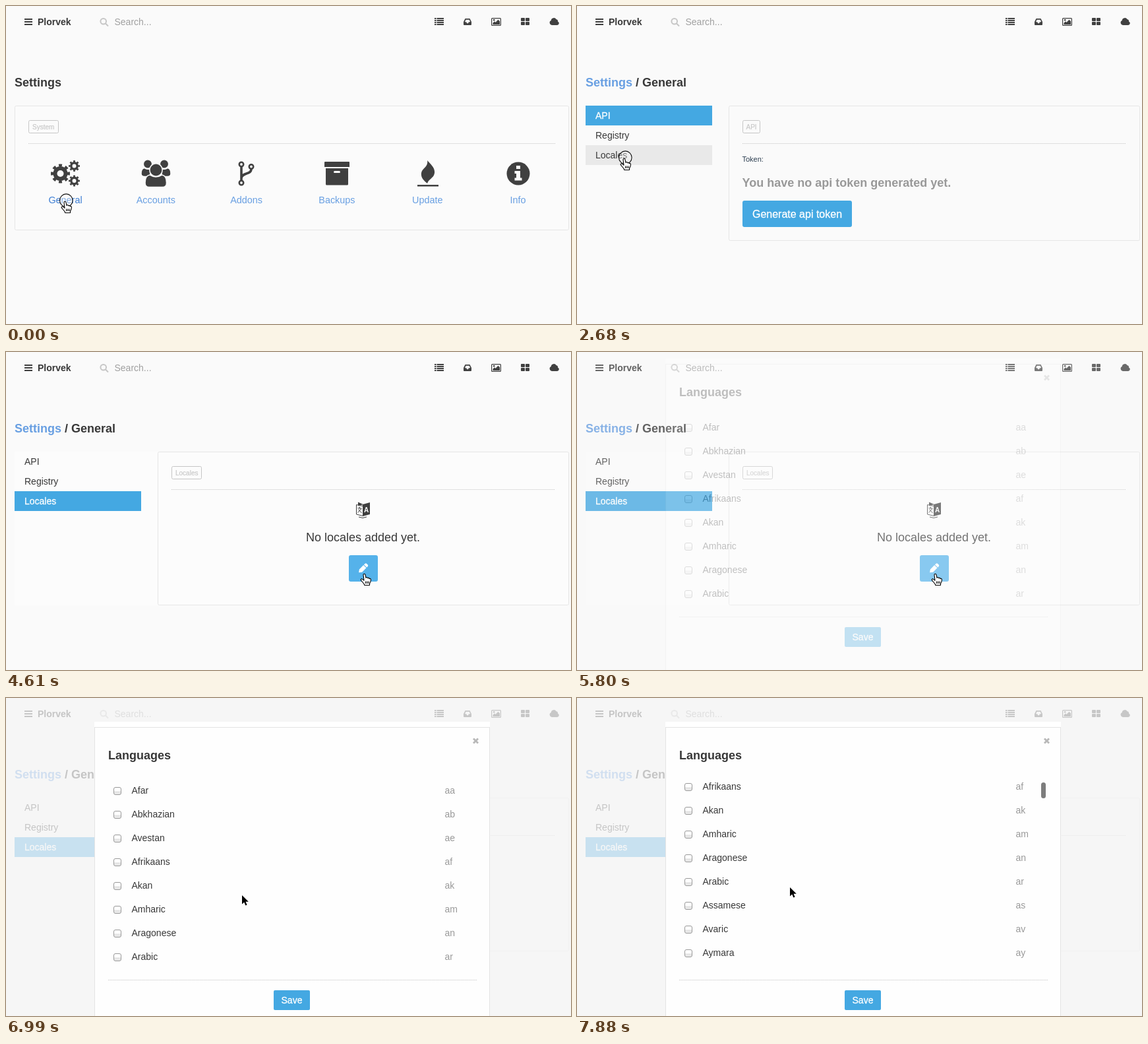
An HTML page for the animation above (8000 ms loop, 857 px wide and 482 px high).

```html
<!DOCTYPE html>
<html lang="en">
<head>
<meta charset="utf-8">
<title>Settings</title>
<style>
  html, body { margin: 0; width: 100%; height: 100%; overflow: hidden; background: #fafafa; }
  svg { display: block; position: absolute; left: 0; top: 0; }
  text { font: 14px "Liberation Sans", Arial, sans-serif; fill: #383838; white-space: pre; }
  .title { font-size: 18px; font-weight: bold; }
  .mid { text-anchor: middle; }
  .link { font-size: 14.4px; fill: #689fe2; text-anchor: middle; }
  .badge text { font-size: 10px; fill: #c8c8c8; stroke: #c8c8c8; stroke-width: .2; }
  .badge rect { fill: none; stroke: #c6c6c6; }
  .white { fill: #fff; stroke: #fff; stroke-width: .3; }
  .panel { stroke: #e6e6e6; }
  .dots { stroke: #c4c4c4; stroke-dasharray: 1 1; }
  .icon { fill: #404040; }
  .line { fill: none; stroke: #404040; }
  .blue { fill: #44a8e2; }
  .code { fill: #999; }
</style>
</head>
<body>
<svg width="857" height="482" viewBox="0 0 857 482">
  <defs>
    <linearGradient id="shade" x2="0" y2="1">
      <stop offset=".45" stop-color="#fff"/><stop offset=".6" stop-color="#e2e2e2"/><stop offset="1" stop-color="#eee"/>
    </linearGradient>
    <clipPath id="window"><rect x="135" y="122" width="598" height="291"/></clipPath>
  </defs>

  <g id="header">
    <path class="icon" d="M28 19h12v2H28zM28 23h12v2H28zM28 27h12v2H28z"/>
    <text x="48" y="29" font-weight="bold" style="font-weight:bold">Plorvek</text>
    <g fill="none" stroke="#c6c6c6" stroke-width="2"><circle cx="147.7" cy="23.2" r="4.3"/><path d="M151 26.5l4 4"/></g>
    <text x="164.500" y="29" style="fill:#a0a0a0">Search...</text>
    <path class="line" stroke-width="2" d="M650 19h2.500M650 22h2.500M650 25h2.500M650 28h2.500M653.500 19H664M653.500 22H664M653.500 25H664M653.500 28H664"/>
    <path class="icon" fill-rule="evenodd" d="M696.500 19h7l2.500 5v4q0 1-1 1h-10q-1 0-1-1v-4zM697.500 20.700l-1.500 3.500h2.200l1 2h1.800l1-2h2.200l-1.500-3.500z"/>
    <rect class="line" x="736.600" y="18.600" width="13.800" height="10.800" rx="1" stroke-width="1.200"/>
    <path class="icon" d="M738.500 28v-2.300l2.500-2.500 1.500 1.500 4-4 2.500 2.500V28z"/><circle class="icon" cx="740.200" cy="21.300" r="1.300"/>
    <g class="icon"><rect x="781" y="18" width="6" height="5" rx="1"/><rect x="788" y="18" width="6" height="5" rx="1"/><rect x="781" y="24" width="6" height="5" rx="1"/><rect x="788" y="24" width="6" height="5" rx="1"/></g>
    <path class="icon" d="M828 29a3.700 3.700 0 0 1-1.300-7a4.300 4.300 0 0 1 8-1.800a2.500 2.500 0 0 1 2.300 3.200a2.900 2.900 0 0 1-1 5.600z"/>
  </g>

  <g id="home">
    <text class="title" x="13" y="122">Settings</text>
    <rect class="panel" x="13.500" y="151.500" width="840" height="188" rx="2" fill="#fbfbfb"/>
    <g class="badge"><rect x="34.500" y="173.500" width="45" height="19" rx="2"/><text x="40" y="187">System</text></g>
    <path class="dots" d="M34 208.500H833"/>
    <g id="gears"></g>
    <g class="icon" stroke="#fbfbfb" stroke-width="1.500">
      <circle cx="215" cy="239.500" r="6.700"/><circle cx="240" cy="239.500" r="6.700"/>
      <path d="M205 254q0-8 5-8.500q5 3 9 1v12h-9q-5 0-5-4.500zM250 254q0-8-5-8.500q-5 3-9 1v12h9q5 0 5-4.500z"/>
      <path d="M211 268q0-11 7-12q9 6 18.500 0q7 1 7 12q0 6.500-6 6.500h-20.500q-6 0-6-6.500z"/><circle cx="227.500" cy="248.500" r="9.700"/>
    </g>
    <g class="line" stroke-width="2.600">
      <circle cx="357" cy="240" r="3.200"/><circle cx="357" cy="268" r="3.200"/><circle cx="372" cy="243.500" r="3.200"/>
      <path stroke-width="3.600" d="M357 243v22M372 247c0 9-14 5-15 14"/>
    </g>
    <path class="icon" fill-rule="evenodd" d="M484 236h36q1 0 1 1v7h-38v-7q0-1 1-1zM485 246h34v24q0 1.500-1.500 1.500h-31q-1.500 0-1.500-1.500zM498.500 250q-1.500 0-1.500 1.500t1.500 1.500h7q1.500 0 1.500-1.500t-1.500-1.500z"/>
    <path class="icon" d="M639 234c5 6 12 11 11 19c-1 8-9 9-11 16c-6-5-10-9-9-16c1-7 11-9 9-19zM624 271h32v2.500h-32z"/>
    <circle class="icon" cx="777" cy="254" r="17.500"/>
    <path fill="#fbfbfb" d="M774 242h6v5h-6zM771.500 250h8.500v10.500h2.500v4h-11v-4h2.500v-6.500h-2.500z"/>
    <g id="links"></g>
  </g>

  <g id="general">
    <rect id="pane" x="13" y="151" width="840" height="233" fill="#fcfcfc"/>
    <text class="title" x="13" y="122"><tspan fill="#689fe2">Settings</tspan> / General</text>
    <g id="nav"></g>
    <g id="api">
      <rect class="panel" x="230.500" y="151.500" width="623" height="204" rx="2" fill="#fafafa"/>
      <g class="badge"><rect x="251.500" y="173.500" width="26" height="19" rx="2"/><text x="256.500" y="187">API</text></g>
      <text x="250.500" y="236" style="font-size:11px;fill:#2c3e50">Token:</text>
      <text class="title" x="250.500" y="274" style="fill:#999">You have no api token generated yet.</text>
      <rect class="blue" x="251" y="295" width="166" height="40" rx="3"/>
      <text class="white mid" x="334" y="321" style="font-size:16px">Generate api token</text>
    </g>
    <g id="locales">
      <rect class="panel" x="230.500" y="151.500" width="623" height="232" rx="2" fill="#fcfcfc"/>
      <g class="badge"><rect x="251.500" y="173.500" width="45" height="19" rx="2"/><text x="257" y="187">Locales</text></g>
      <path class="icon" d="M534 227.500l8 3.500-8 2zM541 231l11-3v18l-11 3z" />
      <path class="line" d="M531.500 231.500l10 2v15l-10-2.500zM535 250q6 3 12 0M533.500 236.500l6 1M536.500 234.500v2.500M538.500 238l-5 5.500M534.500 238.500l5 5.500"/>
      <text class="mid" x="546.500" y="243" style="font-size:10px;font-weight:bold;fill:#fff">A</text>
      <text class="mid" x="541.500" y="287" style="font-size:18px">No locales added yet.</text>
      <rect id="edit" x="520" y="308" width="44" height="40" rx="3"/>
      <path fill="#fff" transform="translate(541.500 328) rotate(-45)" d="M-9 0l4-3H4v6h-9zM5-3h2q2 0 2 2v2q0 2-2 2h-2z"/>
    </g>
    <path class="dots" d="M251 208.500H833"/>
  </g>

  <g id="modal">
    <rect width="857" height="482" fill="#f5f5f5" opacity=".75"/>
    <g id="dialog">
      <rect x="134" y="36" width="600" height="9" fill="#fff"/>
      <rect x="134.500" y="44.500" width="599" height="470" fill="#fefefe" stroke="#e4e4e4"/>
      <path d="M709 61.500l7 7m0-7l-7 7" stroke="#b8b8b8" stroke-width="2.800"/>
      <text class="title" x="155" y="93">Languages</text>
      <g clip-path="url(#window)"><g id="rows"></g></g>
      <rect id="thumb" x="704" width="7" height="24" rx="3.500" fill="#7d7d7d"/>
      <path class="dots" d="M155 427.500H714"/>
      <rect class="blue" x="406" y="443" width="55" height="30" rx="2"/>
      <text class="white mid" x="433.500" y="463">Save</text>
    </g>
  </g>

  <g id="cursor">
    <circle id="ring" cx=".3" cy="-1.300" r="9.800" fill="#fff" fill-opacity=".35" stroke="#111" stroke-width="1.100"/>
    <g id="hand" stroke="#000" stroke-width="1.100" stroke-linejoin="round">
      <path fill="#fff" d="M-3 1.800C-3-.2-.4-.2 0 1.600L1 6.400C1.400 5 3.600 5.200 3.800 7C4.400 5.800 6 6.200 6.200 7.800C7 7 8.600 7.400 8.400 9.400C8.300 12 7.400 13 6.600 15L6.400 17.500H-1.400L-1.800 15.600C-4 13.400-5 11.600-6.600 9.800C-7.600 8.200-5.600 7.400-4.400 8.400L-2 10.200z"/>
      <path fill="none" d="M.6 11.500v3.500M2.800 11.500v3.500M5 11.500v3.500"/>
    </g>
    <path id="arrow" stroke="#fff" stroke-width="1.600" paint-order="stroke" d="M0 0V13.500L3.200 10.600 5.400 15.600 7.600 14.600 5.500 9.800H9.800z"/>
  </g>
</svg>
<script>
const $ = id => document.getElementById(id);
const show = (id, on) => { $(id).style.display = on ? '' : 'none'; };

const gear = (x, y, r, hole) => {
  const body = r * .76;
  const ring = (radius, width, extra = '') =>
    `<circle class="line" cx="${x}" cy="${y}" r="${radius}" stroke-width="${width}" ${extra}/>`;
  return ring((body + hole) / 2, body - hole) +
    ring((r + body) / 2 - .3, r - body + .6, 'pathLength="16" stroke-dasharray="1 1" stroke-dashoffset=".5"');
};
$('gears').innerHTML = gear(82.5, 254, 14.5, 5) + gear(103.5, 242.5, 8.5, 3) + gear(103.5, 265, 8.5, 3);

$('links').innerHTML = ['General', 'Accounts', 'Addons', 'Backups', 'Update', 'Info'].map((name, i) =>
  `<text class="link" x="${90 + i * 137.3}" y="299"${i ? '' : ' style="fill:#3f7fd4"'}>${name}</text>`).join('');

$('nav').innerHTML = ['API', 'Registry', 'Locales'].map((name, i) =>
  `<g><rect x="13" y="${151 + i * 30}" width="192" height="30"/><text x="28" y="${171 + i * 30}">${name}</text></g>`).join('');

const languages = 'Afar aa,Abkhazian ab,Avestan ae,Afrikaans af,Akan ak,Amharic am,Aragonese an,Arabic ar,' +
  'Assamese as,Avaric av,Aymara ay,Azerbaijani az';
$('rows').innerHTML = languages.split(',').map((entry, i) => {
  const [name, code] = entry.split(' ');
  return `<g transform="translate(0 ${140 + i * 36})">
    <rect x="163.5" y="-4.500" width="11" height="11" rx="2.500" fill="url(#shade)" stroke="#999"/>
    <text x="190.500" y="5">${name}</text><text class="code" x="665.500" y="5">${code}</text></g>`;
}).join('');

// Each step changes only the listed properties.
const at = (x, y, more) => ({ x, y, ...more });
const steps = [
  [0, { view: 'home', x: 91, y: 296, hand: true, ring: true, hover: false, button: '#44a8e2', fade: 0, lift: 0, scroll: 0 }],
  [150, { ring: false }],
  [450, { view: 'blank' }],
  [1050, { view: 'api' }],
  [1790, at(82, 281, { hand: false })],
  [1940, at(76, 262)],
  [2090, at(74, 237, { hand: true, hover: true })],
  [2230, at(73, 231)],
  [2680, { ring: true }],
  [2830, { ring: false, view: 'locales', hover: false }],
  [3270, at(160, 234)],
  [3420, at(235, 236, { hand: false })],
  [3570, at(305, 246)],
  [3720, at(435, 282)],
  [3870, at(478, 305)],
  [4020, at(515, 325)],
  [4170, at(552, 336, { hand: true, button: '#55b2ea' })],
  [4610, at(545, 336)],
  [5360, { ring: true, button: '#3f9fd8' }],
  [5660, { ring: false, button: '#55b2ea', fade: .3, lift: -26 }],
  [5810, { fade: .75, lift: -16 }],
  [5960, { fade: 1, lift: -8 }],
  [6100, { lift: 0 }],
  [6550, at(505, 335, { hand: false })],
  [6700, at(430, 315)],
  [6850, at(358, 299)],
  [7000, at(323, 287)],
  [7140, { scroll: 22 }],
  [7290, { scroll: 65 }],
  [7440, { scroll: 92 }],
  [7580, { scroll: 107 }],
  [7880, { scroll: 114 }],
];

function render(time) {
  const s = Object.assign({}, ...steps.filter(([start]) => start <= time).map(([, change]) => change));
  const locales = s.view === 'locales';
  show('header', s.view !== 'blank');
  show('home', s.view === 'home');
  show('general', locales || s.view === 'api');
  show('api', !locales);
  show('locales', locales);
  show('pane', locales);
  [...$('nav').children].forEach((item, i) => {
    const active = i === (locales ? 2 : 0);
    const hovered = i === 2 && s.hover;
    item.firstChild.setAttribute('fill', active ? '#44a8e2' : hovered ? '#e9e9e9' : 'none');
    item.lastChild.setAttribute('class', active ? 'white' : '');
  });
  $('edit').setAttribute('fill', s.button);

  show('modal', s.fade > 0);
  $('modal').setAttribute('opacity', s.fade);
  $('dialog').setAttribute('transform', `translate(0 ${s.lift})`);
  $('rows').setAttribute('transform', `translate(0 ${-s.scroll})`);
  show('thumb', s.scroll > 0);
  $('thumb').setAttribute('y', Math.round(123.4 + s.scroll * .04));

  $('cursor').setAttribute('transform', `translate(${s.x} ${s.y})`);
  show('ring', s.ring);
  show('hand', s.hand);
  show('arrow', !s.hand);
}

const begin = performance.now();
function tick() {
  render((performance.now() - begin) % 8000);
  requestAnimationFrame(tick);
}
tick();
</script>
</body>
</html>
```
